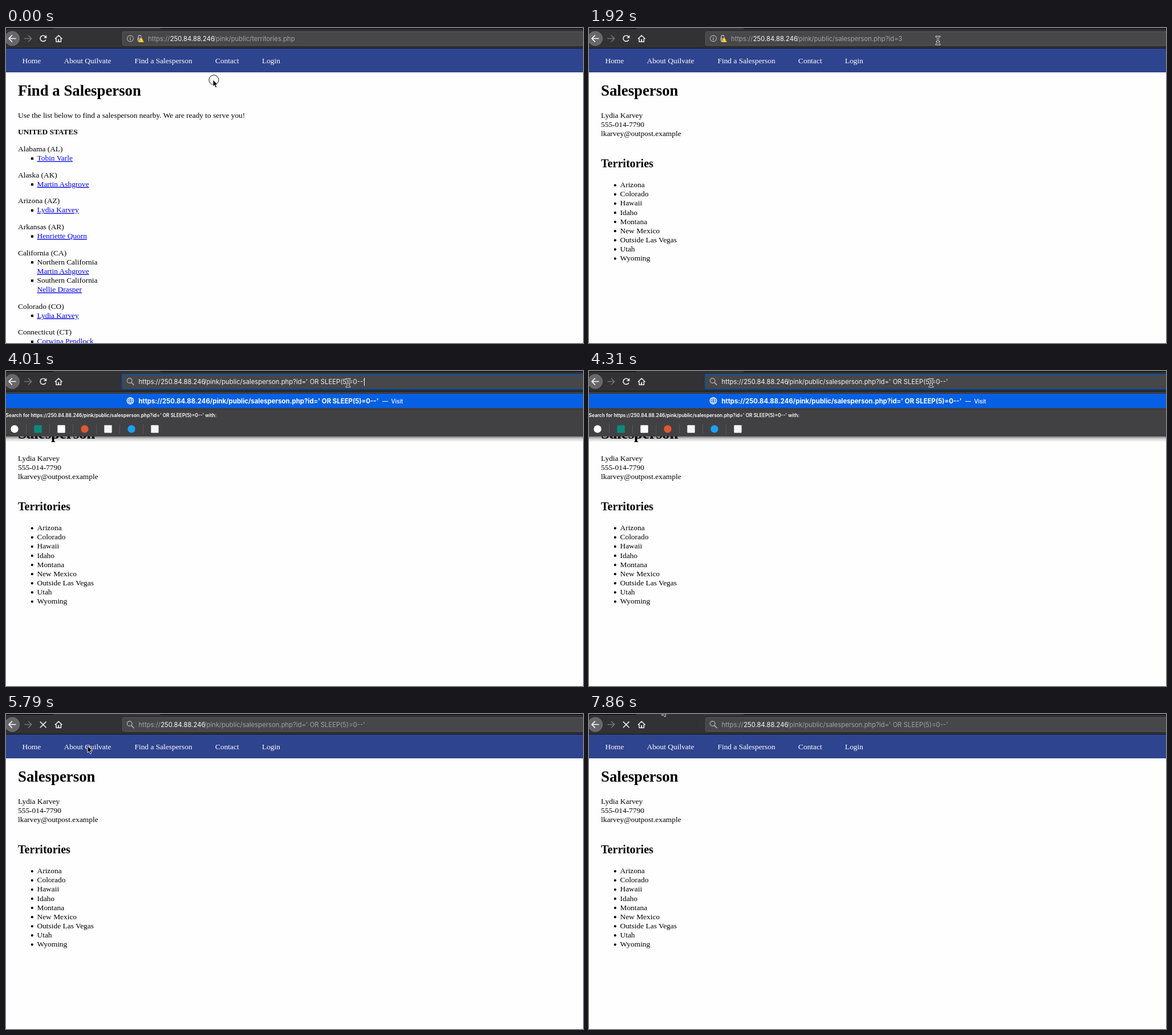
An HTML page for the animation above (8000 ms loop, 1012 by 554 pixels).

```html
<!DOCTYPE html>
<html lang="en">
<head>
<meta charset="utf-8">
<title>Find a Salesperson</title>
<style>
html, body { margin: 0; width: 100%; height: 100%; overflow: hidden; background: #fefefe; }
svg { display: block; width: 100vw; height: 100vh; }
text { white-space: pre; }
.serif { font: 13.4px "Liberation Serif", serif; }
.h1 { font-size: 26.8px; font-weight: bold; }
.h2 { font-size: 20.1px; font-weight: bold; }
.b { font-weight: bold; }
.link { fill: #00e; text-decoration: underline; }
.ui { font: 11.3px Inter, sans-serif; }
.ui.match { font-size: 11.4px; font-weight: 700; }
.ui.hint { font-size: 10px; font-weight: 500; }
.ui.small { font-size: 8.35px; font-weight: 600; }
.line { fill: none; stroke-linecap: round; stroke-linejoin: round; }
</style>
</head>
<body>
<svg id="stage" viewBox="0 0 1012 554"></svg>
<script>
const LOOP = 8000;
const LINE = 16.12;

const text = (x, y, str, cls = "", fill = "") =>
  `<text x="${x}" y="${y}" class="${cls}"${fill && ` fill="${fill}"`}>${str}</text>`;
const rect = (x, y, w, h, fill, extra = "") =>
  `<rect x="${x}" y="${y}" width="${w}" height="${h}" fill="${fill}" ${extra}/>`;
const circle = (x, y, r, fill, extra = "") =>
  `<circle cx="${x}" cy="${y}" r="${r}" fill="${fill}" ${extra}/>`;
const line = (d, stroke, width = 1.5) =>
  `<path class="line" d="${d}" stroke="${stroke}" stroke-width="${width}"/>`;
// A layer visible from one time to another
const during = (from, to, markup) => `<g data-from="${from}" data-to="${to}">${markup}</g>`;

const HOST = "250.84.88.246";
const BASE = "/pink/public/";
const PERSON = BASE + "salesperson.php?id=";
const QUERY = PERSON + "' OR SLEEP(5)=0--'";

// Items: "-" is a bulleted link, "*" a bulleted label, "+" a link without bullet
const states = [
  ["Alabama (AL)", "-Tobin Varle"],
  ["Alaska (AK)", "-Martin Ashgrove"],
  ["Arizona (AZ)", "-Lydia Karvey"],
  ["Arkansas (AR)", "-Henriette Quorn"],
  ["California (CA)", "*Northern California", "+Martin Ashgrove", "*Southern California", "+Nellie Drasper"],
  ["Colorado (CO)", "-Lydia Karvey"],
  ["Connecticut (CT)", "-Corwina Pendlock"]
];

function territoryList() {
  let y = 217, out = "";
  for (const [state, ...items] of states) {
    out += text(21, y, state);
    for (const item of items) {
      y += LINE;
      if (item[0] !== "+") out += rect(43.8, y - 5.6, 4.2, 4.2, "#000");
      out += text(54.5, y, item.slice(1), item[0] === "*" ? "" : "link");
    }
    y += LINE + 13.4;
  }
  return out;
}

const directoryPage = () =>
  text(21, 119, "Find a Salesperson", "h1") +
  text(21, 158, "Use the list below to find a salesperson nearby. We are ready to serve you!") +
  text(21, 187.3, "UNITED STATES", "b") +
  territoryList();

const personPage = () =>
  text(21, 119, "Salesperson", "h1") +
  ["Lydia Karvey", "555-014-7790", "lkarvey@outpost.example"]
    .map((s, i) => text(21, 158 + i * LINE, s)).join("") +
  text(21, 245, "Territories", "h2") +
  ["Arizona", "Colorado", "Hawaii", "Idaho", "Montana", "New Mexico",
    "Outside Las Vegas", "Utah", "Wyoming"]
    .map((s, i) => circle(45.8, 276.6 + i * LINE, 2.1, "#000") + text(54.5, 280.2 + i * LINE, s)).join("");

const navBar = () =>
  rect(0, 36, 1012, 42, "#2f448f") +
  [[28.5, "Home"], [101.5, "About Quilvate"], [225.5, "Find a Salesperson"], [367, "Contact"], [449, "Login"]]
    .map(([x, s]) => text(x, 62, s, "", "#fff")).join("");

const url = (x, path, focused) => {
  const dim = focused ? "#f4f4f5" : "#a3a3a5";
  return text(x, 23, "https://", "ui", dim) +
    text(x + 38.7, 23, HOST, "ui", "#f9f9fa") +
    text(x + 115, 23, path, "ui", dim);
};

const siteIcons = () =>
  circle(218, 18.5, 5.4, "none", 'stroke="#b4b4b6" stroke-width="1.1"') +
  line("M218 18V21.3M218 15.8V15.9", "#b4b4b6", 1.4) +
  rect(230.5, 17.5, 8, 6.5, "#b4b4b6", 'rx="1"') +
  line("M232 17.5V15.5Q232 13 234.5 13T237 15.5V17.5", "#b4b4b6", 1.5) +
  line("M230 24L239 13", "#474749", 1) +
  `<path d="M237.3 16.2L242 25H232.6Z" fill="#ffbf00"/>` +
  line("M237.3 19.3V21.6M237.3 23.3V23.4", "#fff", 1.1);

const searchIcon = () =>
  circle(216.7, 17, 4.3, "none", 'stroke="#a8a8aa" stroke-width="1.5"') +
  line("M220 20.4L224 24.4", "#a8a8aa", 1.9);

const toolbar = () =>
  rect(0, 0, 1012, 36, "#323234") +
  rect(0, 0, 83, 1.4, "#0c0c0d") + rect(271, 0, 741, 1.4, "#0c0c0d") +
  during(0, 140, rect(83, 0, 148, 1, "#1a3348")) +
  during(730, 1180, rect(83, 0, 52, 1.4, "#0b5580")) +
  rect(0, 35, 1012, 1, "#111113") +
  circle(11, 18.5, 12.6, "#676769", 'stroke="#7c7c7e" stroke-width=".8"') +
  line("M16.8 18.5H5.2M10.3 13.2L5 18.5L10.3 23.8", "#f9f9fa", 1.7) +
  line("M32.8 18.5H44.4M39.4 13.2L44.7 18.5L39.4 23.8", "#757577", 1.6) +
  during(6240, 6830, rect(54, 7, 23, 23, "#676769", 'rx="2"')) +
  during(0, 4900, line("M69.4 21.2A5.1 5.1 0 1 1 69 15", "#ececee", 1.7) +
    `<path d="M71.3 12.4V17.7H66Z" fill="#ececee"/>`) +
  during(4900, LOOP, line("M60.3 13.8L70 23.5M70 13.8L60.3 23.5", "#ececee", 1.7)) +
  line("M86.3 18.8L92.2 13L98.1 18.8M88 18.5V24.2H96.4V18.5", "#ececee", 1.6) +
  line("M92.2 23.8V20.5", "#ececee", 2);

const field = () =>
  rect(204.5, 6.5, 820, 24, "#474749", 'rx="2" stroke="#5b5b5d"') +
  during(2220, 4750, rect(204, 6, 820, 25, "#474749", 'rx="2" stroke="#0a529e" stroke-width="2"')) +
  during(0, 4010, siteIcons()) +
  during(4010, LOOP, searchIcon()) +
  during(0, 1030, url(249, BASE + "territories.php")) +
  during(1030, 2220, url(249, PERSON + "3")) +
  during(2220, 2513, rect(249, 12, 299, 14, "#7fa9d4")) +
  during(2513, 2660, rect(548, 12, 1, 14, "#fff")) +
  during(2660, 4010, rect(541, 12, 7.5, 14, "#a9cdee")) +
  during(2220, 4010, url(249, PERSON + "3", true)) +
  during(4010, 4750, url(232.5, QUERY, true)) +
  during(4010, 4310, rect(628, 12, 1, 14, "#fff")) +
  during(4750, LOOP, url(232.5, QUERY));

function dropdown() {
  const full = "https://" + HOST + QUERY;
  const badges = ["#fff", "#0b8a7c", "#fff", "#de5833", "#f4f4f4", "#1da1f2", "#f4f4f4"];
  const round = [0, 3, 5];
  return rect(0, 36, 1012, 79, "#414143") +
    rect(0, 36, 1012, 4, "#3a3a3c") +
    rect(0, 40, 1012, 25, "#0660e4") +
    rect(0, 67, 1012, 1, "#38383a") +
    circle(218, 52.3, 5.8, "none", 'stroke="#fff" stroke-width="1.2"') +
    line("M212.3 52.3H223.7M213.2 49.3H222.8M213.2 55.3H222.8M218 46.5Q212.5 52.3 218 58M218 46.5Q223.5 52.3 218 58", "#fff", 1) +
    text(232.5, 56.5, full, "ui match", "#fff") +
    text(660, 56.5, "—", "ui hint", "#fff") +
    text(675.5, 56.5, "Visit", "ui hint", "#fff") +
    text(-0.5, 81.3, `Search for ${full} with:`, "ui small", "#fff") +
    badges.map((c, i) => {
      const x = 15 + i * 41;
      return (round.includes(i) ? circle(x, 102, 6.7, c) : rect(x - 6.7, 95.3, 13.4, 13.4, c, 'rx="1"')) +
        (i < 6 ? rect(x + 20, 94, 1, 16, "#59595b") : "");
    }).join("") +
    rect(0, 115, 1012, 10, "url(#shade)");
}

const beam = "M-3 -6.8Q0 -6.8 0 -4.8V4.8Q0 6.8 -3 6.8M3 -6.8Q0 -6.8 0 -4.8M0 4.8Q0 6.8 3 6.8M-2 2.2H2";

document.getElementById("stage").innerHTML =
  `<defs><linearGradient id="shade" x2="0" y2="1">
    <stop stop-opacity=".5"/><stop offset=".45" stop-opacity=".16"/><stop offset="1" stop-opacity="0"/>
  </linearGradient></defs>` +
  rect(0, 0, 1012, 554, "#fefefe") +
  `<g class="serif">${during(0, 1030, directoryPage())}${during(1030, LOOP, personPage())}${navBar()}</g>` +
  toolbar() + field() +
  during(4010, 4750, dropdown()) +
  during(0, 140, circle(364.5, 91.3, 8.5, "none", 'stroke="#111" stroke-width="1"')) +
  `<g id="pointer">
    <path id="arrow" d="M0 0V12L2.7 9.6L4.6 14L6.8 13L4.9 8.8H8.6Z" stroke="#fff" stroke-width=".9"/>
    <g id="ibeam">${line(beam, "#fff", 2.8)}${line(beam, "#000", 1.1)}</g>
  </g>`;

// Pointer steps: time, x, y
const steps = [
  [0, 363, 91], [140, 352, 120], [287, 300, 190], [435, 215, 265], [582, 135, 312], [730, 100, 319],
  [1180, 130, 290], [1330, 230, 215], [1475, 380, 130], [1625, 510, 62], [1770, 590, 30], [1920, 612, 22],
  [2070, 600, 21], [5050, 585, 24], [5200, 500, 38], [5350, 390, 52], [5495, 280, 60], [5640, 190, 60],
  [5790, 143, 56], [5940, 118, 46], [6090, 92, 32], [6240, 74, 22], [6385, 66, 18], [6535, 70, 19],
  [6680, 88, 25], [6830, 108, 33], [6980, 124, 35], [7130, 135, 32], [7276, 136, 26], [7422, 134, 18],
  [7568, 132, 10], [7714, 130, 2], [7860, 128, -9]
];

const layers = [...document.querySelectorAll("[data-from]")];
const [pointer, arrow, ibeam] = ["pointer", "arrow", "ibeam"].map(id => document.getElementById(id));
const show = (el, on) => { el.style.display = on ? "" : "none"; };

function draw(t) {
  for (const el of layers) show(el, t >= +el.dataset.from && t < +el.dataset.to);
  const [, x, y] = steps.filter(s => s[0] <= t).pop();
  const overField = x > 204 && y > 6 && y < 32;
  pointer.setAttribute("transform", `translate(${x} ${y})`);
  show(arrow, !overField);
  show(ibeam, overField);
}

const start = performance.now();
function tick() {
  draw((performance.now() - start) % LOOP);
  requestAnimationFrame(tick);
}
tick();
</script>
</body>
</html>
```
